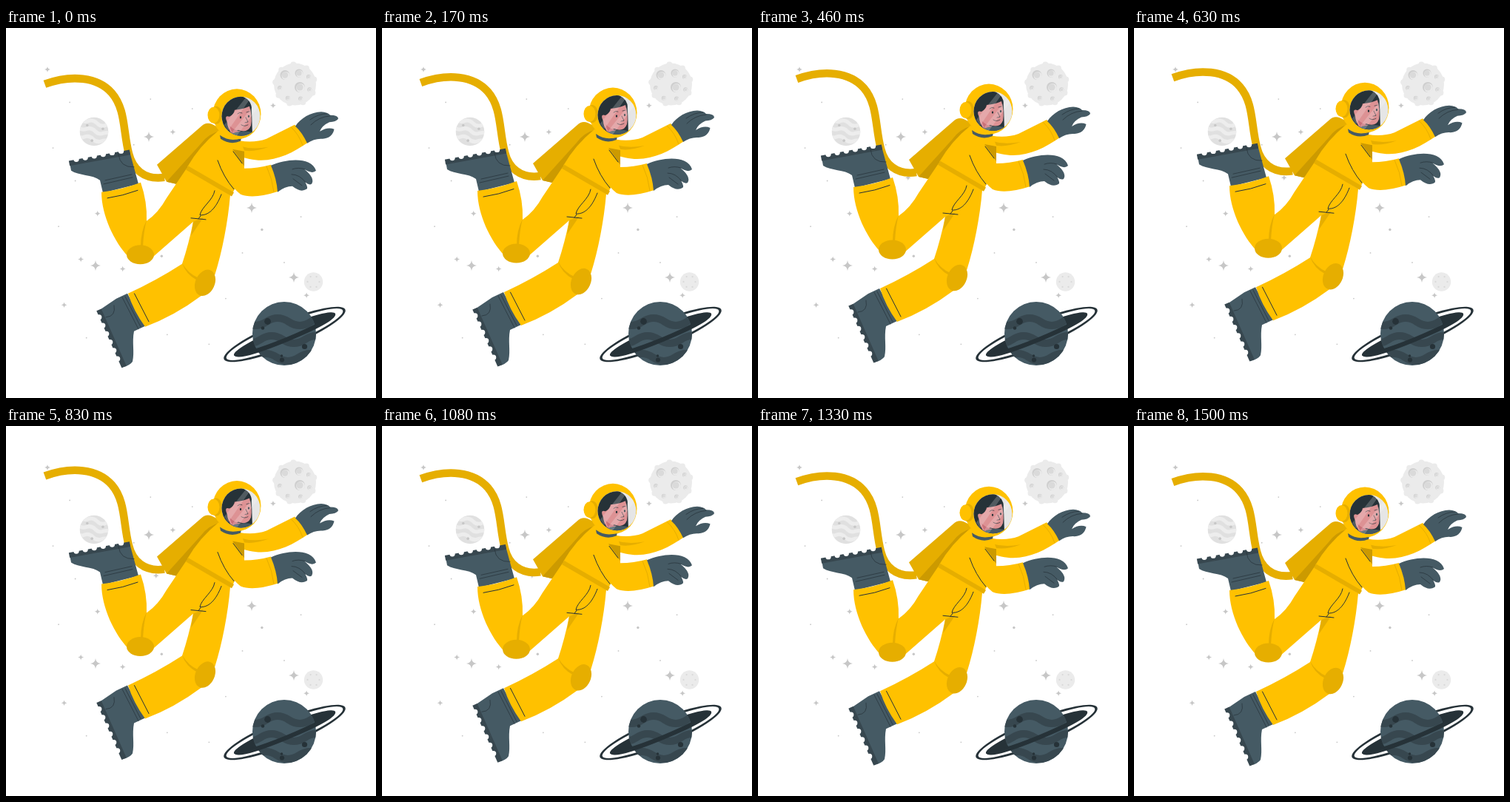
An HTML page that plays this animation: 500x500 px, repeating every 1540 ms.

```html
<!DOCTYPE html>
<html lang="en">
<head>
<meta charset="utf-8">
<title>Floating astronaut</title>
<style>
  html, body { margin: 0; width: 100%; height: 100%; overflow: hidden; background: #fff; }
  svg { display: block; width: 100vw; height: 100vh; }
  .suit { fill: #ffc100; }
  .shade { fill: #e6ae00; }
  .deep { fill: #cc9a00; }
  .slate { fill: #455a64; }
  .ink { fill: #263238; }
  .line, .fold, .sole, .bites, .wave { fill: none; }
  .line { stroke: #263238; stroke-linecap: round; }
  .thin { stroke-width: .7; }
  .fold { stroke: #e6ae00; }
  .sole { stroke: #37474f; stroke-width: 7; }
  .bites { stroke: #fff; stroke-width: 7.4; stroke-linecap: round; stroke-dasharray: 0 12.3; }
</style>
</head>
<body>
<svg viewBox="0 0 500 500">
  <defs>
    <clipPath id="disc"><circle cx="376" cy="413" r="43"/></clipPath>
    <clipPath id="small"><circle cx="119" cy="140" r="19.3"/></clipPath>
    <clipPath id="visor"><ellipse cx="317.5" cy="119.5" rx="26" ry="26.5"/></clipPath>
    <clipPath id="front"><path d="M-90 0H90V40H-90Z"/></clipPath>
  </defs>

  <g id="stars" fill="#c7c7c7"></g>
  <g id="moon" fill="#ebebeb"><circle cx="390.5" cy="76" r="28.5"/></g>

  <g clip-path="url(#small)">
    <circle cx="119" cy="140" r="20" fill="#e0e0e0"/>
    <g id="stripes" transform="rotate(14 119 140)" stroke="#ededed"></g>
    <g id="pits" fill="#c7c7c7"></g>
  </g>

  <circle cx="415.5" cy="343" r="12.7" fill="#ebebeb"/>
  <g id="spots" fill="#d9d9d9"></g>

  <g transform="translate(376.5 414) rotate(-22.3)">
    <ellipse class="ink" rx="88.6" ry="17.6"/>
    <ellipse fill="#fff" rx="85" ry="14.6"/>
    <ellipse class="ink" rx="74" ry="10.5"/>
  </g>
  <circle class="slate" cx="376" cy="413" r="43"/>
  <g clip-path="url(#disc)">
    <g id="bands" stroke="#37474f"></g>
    <g id="holes" class="ink"></g>
  </g>
  <g transform="translate(376.5 414) rotate(-22.3)" clip-path="url(#front)">
    <ellipse rx="71" ry="7.5" fill="none" stroke="#263238" stroke-width="6"/>
  </g>

  <g id="astronaut">
    <path d="M52.4 76C88 63 124 66 143 88C162 110 158 140 166 170C171 190 186 206 214 202" fill="none" stroke="#e6ae00" stroke-width="10.6"/>

    <!-- far arm -->
    <path class="suit" d="M300 149Q330 158 352 150L390 131Q401 141 408 155C380 174 350 188 312 172Z"/>
    <path class="shade" d="M317 160Q333 165 355 161Q333 169 318 165Z"/>
    <path class="fold" d="M385 134Q396 144 401 159"/>
    <path class="slate" d="M391 133C398 122 412 114 426 113.5Q435 114 438 118Q449 118 449 123Q446 127 437 127.5Q427 132 424 140Q435 133 443.5 137Q441 149 428 150Q417 149 407 156Q400 141 391 133Z"/>
    <path class="line thin" d="M438 119Q423 120 412 131M434 116Q422 116 411 124"/>

    <!-- backpack -->
    <path class="shade" d="M204 185L264 133Q270 127 278 130L292 137L230 211L217 208Z"/>
    <path class="deep" d="M217 208L263 157Q273 143 290 139L230 211Z"/>

    <!-- boots -->
    <path class="slate" d="M86 182L167 167L179 211L131 223L127 206C117 198 98 200 88 193Z"/>
    <path class="sole" d="M85.5 183L167.5 168"/>
    <path class="bites" d="M95 177.4L160 165.5"/>
    <path class="line thin" d="M152 171Q154 189 173 188M132 211L171 202M134 206L170 198"/>
    <path class="slate" d="M124 383L149 366L164 359L188 403L173 410C170 425 174 438 171 451Q168 456 157 459Z"/>
    <path class="sole" d="M125.5 381L159.5 458"/>
    <path class="bites" d="M125.7 391L154 455"/>
    <path class="line thin" d="M146 375Q149 390 135 391M157 364L179 407M161 363L182 404"/>

    <!-- legs -->
    <path class="suit" d="M129 222Q156 219 182 209Q191 235 190 261Q206 250 217 230L244 190L303 226C300 262 292 303 282.5 333L264 362Q228 389 188 404Q172 382 165 359Q204 341 238 319Q247 292 253 262L197 311L165 309C147 290 129 254 129 222Z"/>
    <path class="shade" d="M190 260Q182 275 182 296H185Q186 275 190 260ZM238 318Q246 332 260 338L258 341Q243 333 238 318ZM253 262L267 256L250 281Z"/>
    <ellipse class="shade" cx="181.5" cy="306.5" rx="18.5" ry="13"/>
    <ellipse class="shade" cx="269" cy="344.5" rx="13" ry="18.5" transform="rotate(24 269 344.5)"/>
    <path class="line" d="M137 230Q158 227 178 219.5M173.5 359L193 397M282 220C280 233 264 242 262 253C277 254 286 238 291 225M263 254L260 258M250 257L270 259"/>

    <!-- torso and near arm -->
    <path class="suit" d="M287 139Q261 160 245 188L306 224L322 190V166L316 150Z"/>
    <path d="M244.5 189L306.5 225" stroke="#e6ae00" stroke-width="6"/>
    <path class="deep" d="M306 164L322 167V187Z"/>
    <path class="suit" d="M287 179C290 167 299 162 307 167L322 190Q340 190 358 185Q366 204 368 221Q334 232 317 225Q299 211 287 179Z"/>
    <path class="line" d="M286 179Q294 202 308 218M307 167L319 183"/>
    <path class="fold" d="M352 187Q360 204 362 222"/>
    <path class="slate" d="M358 186C380 176 413 174 419 193Q414 198 403 191Q418 203 413 211Q409 213 404 208Q409 217 406 218Q398 223 387 214Q377 214 367 222Q366 205 358 186Z"/>
    <path class="line thin" d="M404 191Q395 188 387 191M405 209Q397 198 386 198M400 213L388 204"/>

    <!-- helmet -->
    <path class="slate" d="M289 145Q303 155 318 149L317 153Q303 159 290 150Z"/>
    <ellipse class="suit" cx="312" cy="116.500" rx="32.5" ry="34"/>
    <ellipse class="shade" cx="284" cy="118" rx="8" ry="12"/>
    <ellipse class="suit" cx="280.5" cy="118" rx="8" ry="11"/>
    <g clip-path="url(#visor)">
      <path fill="#e6e6e6" d="M290 92H346V147H290Z"/>
      <path class="ink" d="M290 92H318Q332 97 332 110L333 147H290Z"/>
      <path fill="#dd9294" d="M302 120Q308 117 309 111Q321 110 329 106Q333 120 331 132Q327 143 314 138L304 142Q299 134 299 128Q294 117 302 120Z"/>
      <path fill="#c97078" d="M302 132Q308 139 318 140L306 143Z"/>
      <path class="slate" d="M300 146Q314 137 333 141V149H300Z"/>
      <path class="line thin" d="M313 116Q316 113 319 115M325 114L329 113M324 121L327 127L323 128M318 131Q322 134 327 131"/>
      <path class="line" stroke-width="2.2" d="M317 120.500V121.500M328 119V120"/>
      <path fill="#fff" opacity=".2" d="M295 131L325 93H332L300 139ZM304 143L340 98L344 103L311 147Z"/>
    </g>
  </g>
</svg>
<script>
  const LOOP = 1540, LEAD = 65, RISE = 9;
  const byId = id => document.getElementById(id);
  const fill = (id, parts) => byId(id).insertAdjacentHTML('beforeend', parts.join(''));
  const times = (n, make) => Array.from({ length: n }, (_, i) => make(i));
  const dot = (x, y, r, color) => `<circle cx="${x}" cy="${y}" r="${r}" ${color ? `fill="${color}"` : ''}/>`;
  const polar = (x, y, r, a) => [x + r * Math.cos(a), y + r * Math.sin(a)];
  const wave = (x, y, step, width) =>
    `<path class="wave" stroke-width="${width}" d="M${x} ${y}q${step / 2} ${step / 3} ${step} 0t${step} 0t${step} 0t${step} 0"/>`;
  const sparkle = (x, y, r) => {
    const k = r * .1;
    return `<path transform="translate(${x} ${y})" d="M0 ${-r}Q${k} ${-k} ${r} 0Q${k} ${k} 0 ${r}Q${-k} ${k} ${-r} 0Q${-k} ${-k} 0 ${-r}Z"/>`;
  };
  // Evenly scattered points over the sky
  const sky = i => [56 + 384 * (i * .7549 % 1), 56 + 380 * (i * .5698 % 1)];

  fill('stars', [
    sparkle(193, 147, 7), sparkle(121, 321, 7), sparkle(332, 243, 7), sparkle(389, 337, 7),
    ...times(40, i => i % 3 ? dot(...sky(i), i % 6 === 1 ? 1.7 : .9) : sparkle(...sky(i), 4))
  ]);

  const crater = (x, y, r) =>
    dot(x, y, r, '#cfcfcf') + dot(x + r * .15, y + r * .15, r * .85, '#ebebeb') + dot(x, y, r * .65, '#dadada');
  fill('moon', [
    ...times(9, i => dot(...polar(390.5, 76, 26.5, i * .7 - 1.65), 4)),
    crater(377, 63.5, 6.5), crater(396, 61, 5.5), crater(397, 80, 7),
    ...times(5, i => crater(...polar(390.5, 76, 21, i * .85 - .5), 3))
  ]);

  fill('stripes', times(3, i => wave(96, 128 + 11 * i, 12, 5)));
  fill('pits', times(3, i => dot(...polar(119, 140, 12.5, i * 2.1 - 2.4), 1.8)));
  fill('spots', times(6, i => dot(...polar(415.5, 343, 8, i * 1.05), 1.1)));
  fill('bands', times(3, i => wave(322 - 8 * i, 397 + 24 * i, 30, 10)));
  fill('holes', [
    dot(353.5, 396.5, 4.4), dot(347, 405.5, 2.3), dot(373, 448.5, 3.1), dot(372.5, 443, 1.7), dot(403.5, 430.5, 3.6)
  ]);

  function draw() {
    const turn = 2 * Math.PI * (performance.now() % LOOP + LEAD) / LOOP;
    byId('astronaut').setAttribute('transform', `translate(0 ${-RISE * (1 - Math.cos(turn)) / 2})`);
    requestAnimationFrame(draw);
  }
  draw();
</script>
</body>
</html>
```
